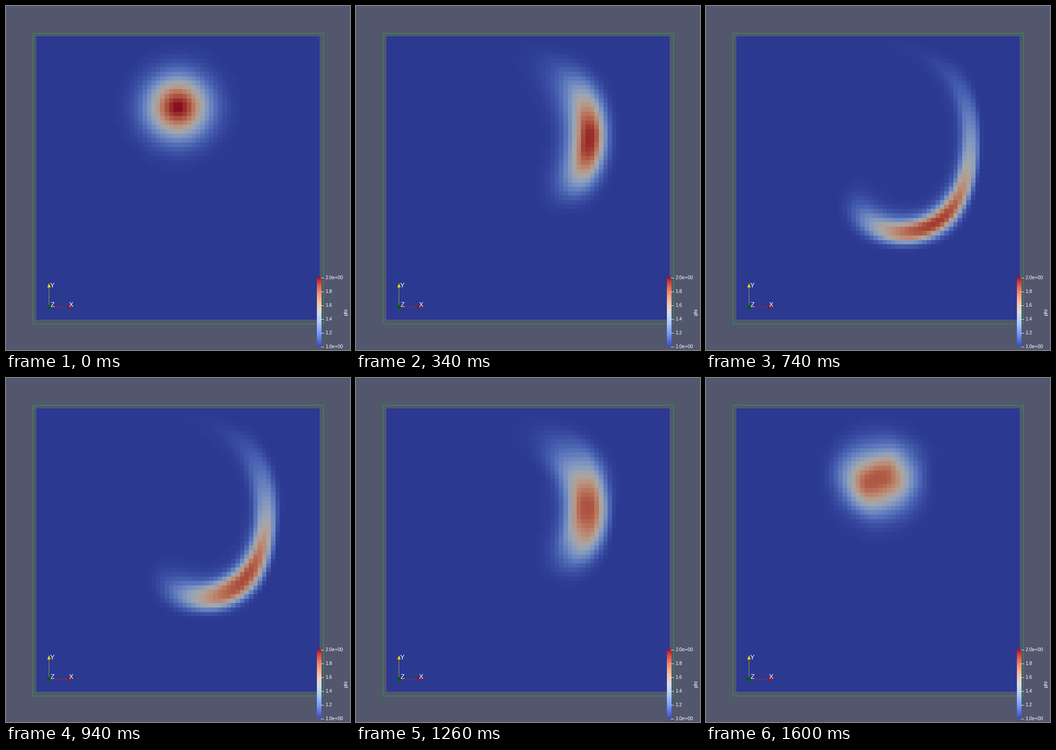
A matplotlib script for the animation above (1.66 s loop, 748 by 748 pixels).

```python
import numpy as np
import matplotlib.pyplot as plt
from matplotlib.animation import FuncAnimation
from matplotlib.colors import ListedColormap
from matplotlib.patches import Circle, Polygon, Rectangle

SIZE = 748
DPI = 100
PX = 72 / DPI          # one pixel in points
TICK = 20              # ms
TICKS = 83
FRAMES = 25

# ---- advection of a Gaussian blob in a reversing vortex ----
N = 64
H = 1 / N
CFL = 0.7
STOP = 2.0
PLOT_EVERY = 5

centers = (np.arange(N) + 0.5) * H
X, Y = np.meshgrid(centers, centers, indexing="ij")


def at(a, n, axis):
    """Value of a at index + n along axis, periodic."""
    return np.roll(a, -n, axis)


def velocity(t):
    """Face velocities from the stream function."""
    psi = (np.sin(np.pi * X) * np.sin(np.pi * Y)) ** 2
    psi = psi * np.cos(np.pi * t / STOP) / np.pi
    px = psi + at(psi, -1, 0)
    py = psi + at(psi, -1, 1)
    vx = -(at(px, 1, 1) - at(px, -1, 1)) * 0.25 / H
    vy = (at(py, 1, 0) - at(py, -1, 0)) * 0.25 / H
    return vx, vy


def slope(q, axis):
    """Fourth-order monotonised slope."""
    left = q - at(q, -1, axis)
    right = at(q, 1, axis) - q
    mid = 0.5 * (left + right)
    limit = 2 * np.minimum(abs(left), abs(right))
    limit = np.where(left * right >= 0, limit, 0)
    sign = np.sign(mid)
    s2 = sign * np.minimum(limit, abs(mid))
    s4 = 4 / 3 * mid - (at(s2, 1, axis) + at(s2, -1, axis)) / 6
    return sign * np.minimum(limit, abs(s4))


def upwind(v, low, high):
    return np.where(v < 0, high, low)


def edge(q, v, c, axis):
    """Low and high side states on the faces, and the upwinded one."""
    s = slope(q, axis)
    low = at(q, -1, axis) + (0.5 - 0.5 * c * v) * at(s, -1, axis)
    high = q - (0.5 + 0.5 * c * v) * s
    return low, high, upwind(v, low, high)


def advance(q, t, dt):
    c = dt / H
    vel = velocity(t + dt / 2)
    edges = [edge(q, vel[a], c, a) for a in (0, 1)]
    out = q.copy()
    for a in (0, 1):
        b = 1 - a
        v, w, side = vel[a], vel[b], edges[b][2]
        cross = 0.25 * c * (at(w, 1, b) + w) * (at(side, 1, b) - side)
        low, high, _ = edges[a]
        flux = v * upwind(v, low - at(cross, -1, a), high - cross)
        out -= c * (at(flux, 1, a) - flux)
    return out


def simulate():
    q = 1 + np.exp(-((X - 0.5) ** 2 + (Y - 0.75) ** 2) / 0.01)
    t, dt, step = 0.0, None, 0
    states = [q]
    while t < STOP - 1e-9:
        speed = max(abs(v).max() for v in velocity(t + 0.5 * (dt or 0)))
        new = CFL * H / max(speed, 1e-9)
        dt = min(new, 1.1 * dt) if dt else new
        dt = min(dt, STOP - t)
        q = advance(q, t, dt)
        t += dt
        step += 1
        if step % PLOT_EVERY == 0 or t >= STOP - 1e-9:
            states.append(q)
    return states


states = simulate()

# ---- stage ----
fig = plt.figure(figsize=(SIZE / DPI, SIZE / DPI), dpi=DPI, facecolor="#52576e")
ax = fig.add_axes([0, 0, 1, 1])
ax.axis("off")

coolwarm = plt.get_cmap("coolwarm")
shaded = ListedColormap(coolwarm(np.linspace(0, 1, 256))[:, :3] * 0.755)


def picture(data, cmap, extent, z):
    return ax.imshow(data, cmap=cmap, vmin=1, vmax=2, extent=extent,
                     aspect="auto", interpolation="nearest", zorder=z)


def line(xs, ys, color, z, width=1.0):
    ax.plot(xs, ys, color=color, lw=width * PX, zorder=z,
            solid_capstyle="butt")


def label(x, y, s, size, **kw):
    opts = dict(ha="left", va="center_baseline", color="white", zorder=8)
    opts.update(kw)
    ax.text(x, y, s, fontsize=size * PX, family="Liberation Sans", **opts)


def grid_image(q):
    return q.T[::-1]


field = picture(grid_image(states[0]), shaded, (66, 682, 682, 66), 2)

# bounding box
GREEN = "#2da144"
ax.add_patch(Rectangle((58.5, 58.5), 632, 632, fill=False, ec=GREEN,
                       lw=PX, zorder=3))
for x0, x1 in ((58.5, 66.5), (690.5, 682.5)):
    for y0, y1 in ((58.5, 66.5), (690.5, 682.5)):
        line([x0, x1], [y0, y1], "#3f8058", 1, 0.8)

# orientation axes
line([93.5, 93.5], [654, 611], "#a5a545", 4)
line([93, 136], [654.5, 654.5], "#b01c30", 4)
ax.add_patch(Polygon([(93.5, 603), (89.8, 612), (97.2, 612)],
                     fc="#e3dc0c", ec="none", zorder=5))
ax.add_patch(Polygon([(135, 650.5), (135, 658.2), (145, 654.5)],
                     fc="#d80808", ec="none", zorder=5))
line([135.5, 135.5], [650.5, 658], "#3a0a10", 6)
ax.add_patch(Circle((93.5, 654.5), 4.6, fc="#065a10", ec="none", zorder=6))
for x, y, s in ((95.5, 612.5, "Y"), (96.8, 653.5, "Z"), (137, 654.5, "X")):
    label(x, y, s, 14.5, va="baseline")

# colour legend
TOP, BOTTOM = 591, 740.5
picture(np.linspace(2, 1, 256)[:, None], coolwarm, (676, 686, BOTTOM, TOP), 6)
for v in (1.0, 1.2, 1.4, 1.6, 1.8, 2.0):
    y = BOTTOM + (v - 1) * (TOP - BOTTOM)
    line([684.5, 691], [y, y], "white", 7, 0.9)
    s = f"{v:.1f}" if 1 < v < 2 else f"{v:.1e}"
    label(694.3, y + 3.2, s, 10.6, va="baseline")
label(739.5, 665, "phi", 11.5, ha="center", va="center", rotation=90)

ax.set_xlim(0, SIZE)
ax.set_ylim(SIZE, 0)


def update(n):
    # shots of 60, 80 and 60 ms in turn
    group, rest = divmod(n, 10)
    k = 3 * group + (rest >= 3) + (rest >= 7)
    field.set_data(grid_image(states[min(k, FRAMES - 1, len(states) - 1)]))
    return [field]


anim = FuncAnimation(fig, update, frames=TICKS, interval=TICK,
                     repeat=True, repeat_delay=0, blit=False)
plt.show()
```
